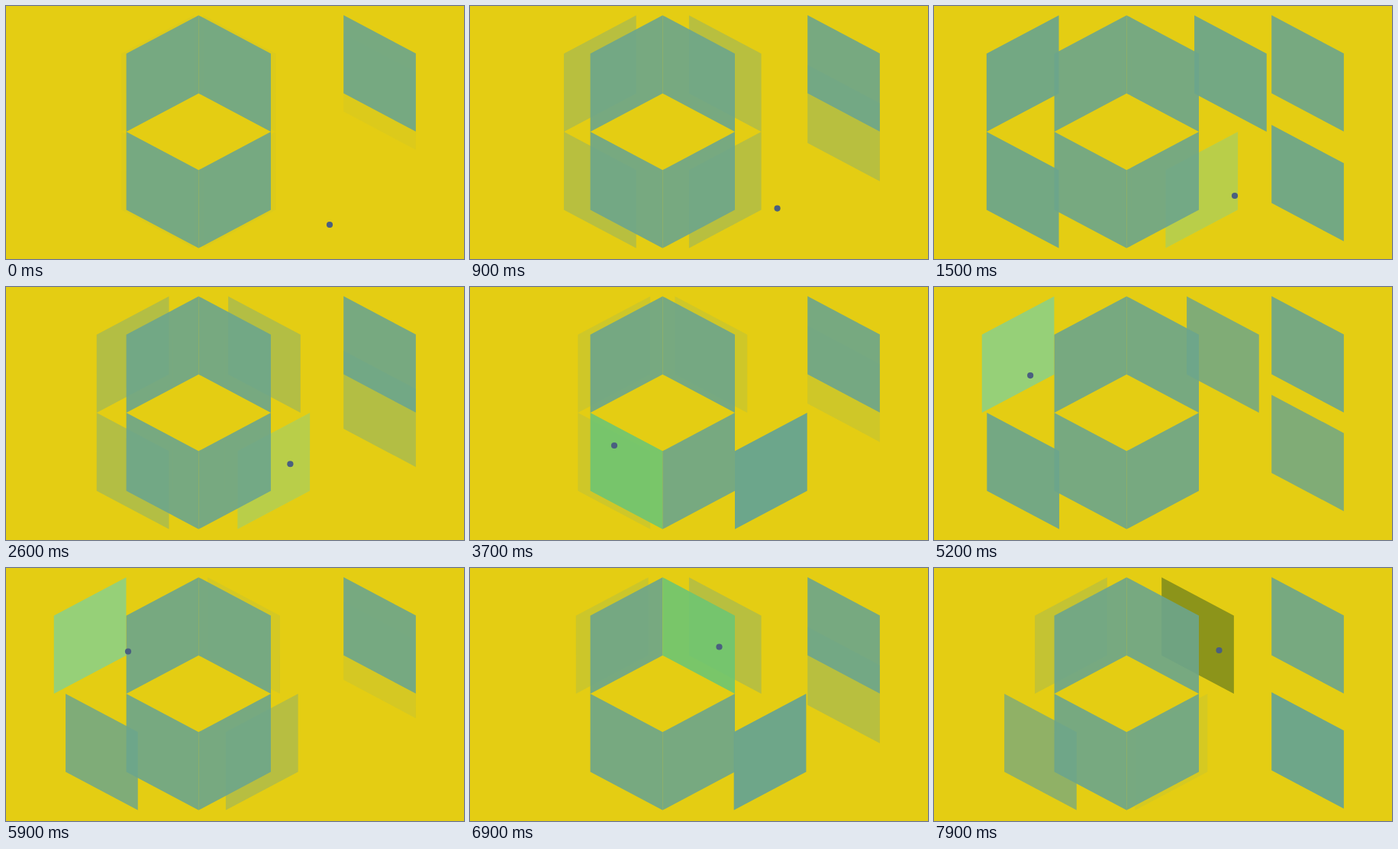
An HTML page for the animation above (8000 ms loop, 600 by 332 pixels).

```html
<!DOCTYPE html>
<html lang="en">
<head>
<meta charset="utf-8">
<title>Sliding panels</title>
<style>
  html, body { margin: 0; width: 100%; height: 100%; overflow: hidden; background: #e4cd13; }
  svg { display: block; width: 600px; height: 332px; }
</style>
</head>
<body>
<svg viewBox="0 0 600 332"><g id="movers"></g><g id="bases"></g><circle id="dot" r="4.1" fill="#4a5f80"/></svg>
<script>
const LOOP = 8000, STEP = 100, HALF = 1500, PHASE = 270;
const W = 94.7, H = 102.5, RISE = 50.3;
const FILL = '#6ca68c', BASE_HOVER = '#6ec673', LIGHT = '#96d078', DARK = '#2e5523';

// x, y: upper left corner; slope: 1 falls to the right, -1 rises
// from, to: travel along the axis at progress 0 and 1
const panels = {
  a: { x: 157.6, y: 62.5, slope: -1, axis: 'x', from: 0, to: -95, hover: LIGHT },
  b: { x: 252.3, y: 12.2, slope: 1, axis: 'x', from: 0, to: 95, hover: DARK },
  c: { x: 157.6, y: 165, slope: 1, axis: 'x', from: 0, to: -95, hover: DARK },
  d: { x: 252.3, y: 215.3, slope: -1, axis: 'x', from: 0, to: 95, hover: LIGHT },
  e: { x: 442.2, y: 12, slope: 1, axis: 'y', from: 15, to: 153, hover: DARK }
};

// Hovering a moving panel also pauses it: [panel, start, end]
const moverHovers = [['d', 1053, 3043], ['c', 4000, 4710], ['a', 4813, 5905], ['b', 7005, LOOP]];
const baseHovers = [['d', 3043, 3460], ['c', 3460, 4000], ['a', 5905, 6420], ['b', 6420, 7005]];

const pointer = [
  [0, 424, 287], [1050, 399, 262], [1500, 394, 249], [2400, 383, 236],
  [3040, 349, 224], [3450, 254, 213], [3700, 189, 208], [4000, 158, 206],
  [4600, 128, 204], [4810, 127, 132], [5300, 126, 112], [5900, 160, 109.5],
  [6400, 250, 106], [6900, 326.5, 103.5], [7100, 350, 104], [7900, 373.5, 108]
];

const $ = id => document.getElementById(id);

function addPanel(parent, { x, y, slope }) {
  const el = document.createElementNS('http://www.w3.org/2000/svg', 'path');
  const d = slope * RISE;
  el.setAttribute('d', `M${x} ${y}l${W} ${d}v${H}l${-W} ${-d}z`);
  parent.append(el);
  return el;
}

for (const p of Object.values(panels)) {
  p.mover = addPanel($('movers'), p);
  p.base = addPanel($('bases'), p);
  p.base.setAttribute('opacity', 0.9);
}

// cubic-bezier(.42, 0, .58, 1)
function easeInOut(x) {
  let lo = 0, hi = 1;
  for (let i = 0; i < 24; i++) {
    const s = (lo + hi) / 2;
    if (s * (1.26 + s * (-0.78 + s * 0.52)) < x) lo = s; else hi = s;
  }
  return lo * lo * (3 - 2 * lo);
}

function progress(time) {
  const u = ((time - PHASE) / HALF + 2) % 2;
  return easeInOut(u < 1 ? u : 2 - u);
}

function pausedTime(key, t) {
  return moverHovers.reduce((sum, [k, start, end]) =>
    k === key && t > start ? sum + Math.min(t, end) - start : sum, 0);
}

const isHovered = (list, key, t) =>
  list.some(([k, start, end]) => k === key && t >= start && t < end);

function pointerAt(t) {
  const i = pointer.findIndex(p => p[0] > t);
  if (i < 0) return pointer[pointer.length - 1].slice(1);
  const [t0, x0, y0] = pointer[i - 1], [t1, x1, y1] = pointer[i];
  const k = (t - t0) / (t1 - t0);
  return [x0 + (x1 - x0) * k, y0 + (y1 - y0) * k];
}

function draw(t) {
  for (const [key, p] of Object.entries(panels)) {
    const k = progress(t - pausedTime(key, t));
    const shift = p.from + (p.to - p.from) * k;
    const move = p.axis === 'x' ? [shift, 0] : [0, shift];
    p.mover.setAttribute('transform', `translate(${move})`);
    p.mover.setAttribute('opacity', k);
    p.mover.setAttribute('fill', isHovered(moverHovers, key, t) ? p.hover : FILL);
    p.base.setAttribute('fill', isHovered(baseHovers, key, t) ? BASE_HOVER : FILL);
  }
  const [x, y] = pointerAt(t);
  $('dot').setAttribute('cx', x);
  $('dot').setAttribute('cy', y);
}

const begin = performance.now();
function tick() {
  const t = (performance.now() - begin + 10) % LOOP;
  draw(Math.floor(t / STEP) * STEP);
  requestAnimationFrame(tick);
}
tick();
</script>
</body>
</html>
```
